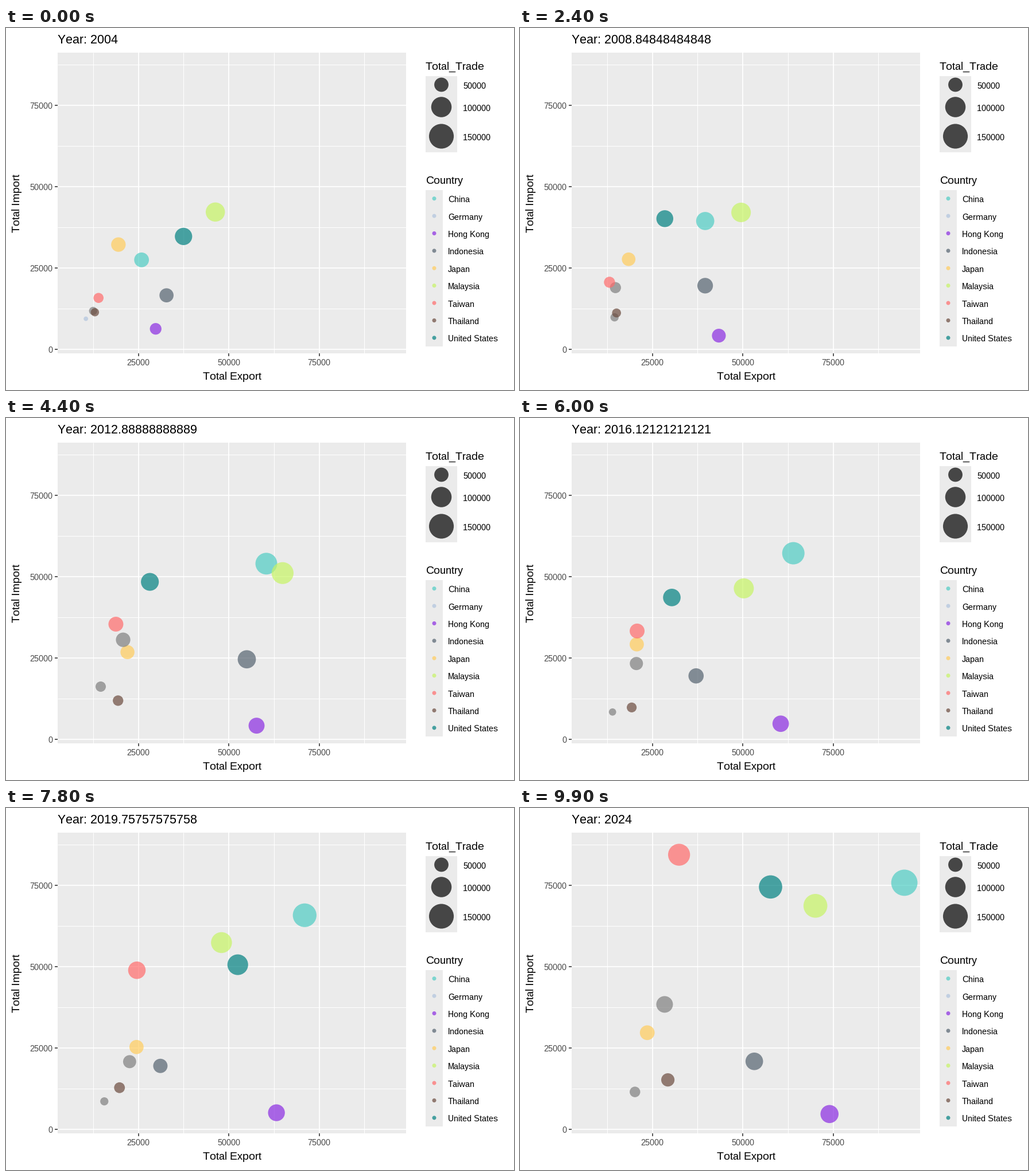
Animation of 885x632 px, one loop 10 s. Source, as a matplotlib script:

```python
import matplotlib.pyplot as plt
import numpy as np
from matplotlib.animation import FuncAnimation
from matplotlib.patches import Circle, Rectangle

W, H, DPI = 885, 632, 100
FRAMES, FIRST, SPAN = 100, 2004, 20
STEPS = [0, 15, 32, 44, 60, 78, 99]
PANEL, GREY, ALPHA = "#EBEBEB", "#7F7F7F", 0.7
SMALL, MEDIUM, LARGE = 15, 19, 22

plt.rcParams.update({
    "font.family": ["Liberation Sans", "DejaVu Sans"],
    "text.hinting": "native",
    "text.hinting_factor": 1,
    "text.kerning_factor": 6,
})

COLORS = {
    "China": "#4ECDC4", "Germany": "#B0C4DE", "Hong Kong": "#8A2BE2",
    "Indonesia": "#556270", "Japan": "#FFCC5C", "Malaysia": "#C7F464",
    "Taiwan": "#FF6B6B", "Thailand": "#6B4B3E", "United States": "#008080",
}


def px(export):
    return 230.5 + 6.3 * (export - 25)


def py(imports):
    return 561 - 5.68 * imports


def radius(total):
    """Area scale: the smallest total gets the smallest dot."""
    return 3.9 + 19.3 * np.sqrt(max(total - 19.9, 0) / 155.4)


def cycle(frame):
    """World trade: the 2009 slump and the 2022 boom."""
    slump = 0.21 * max(0, 1 - abs(frame - 25) / 5)
    boom = 0.12 * max(0, 1 - abs(frame - 89) / 10)
    return 1 - slump + boom


fig = plt.figure(figsize=(W / DPI, H / DPI), dpi=DPI, facecolor="white")
ax = fig.add_axes([0, 0, 1, 1])
ax.set_xlim(0, W)
ax.set_ylim(H, 0)
ax.axis("off")


def box(x0, y0, x1, y1):
    ax.add_patch(Rectangle((x0, y0), x1 - x0, y1 - y0, fc=PANEL, lw=0, zorder=0))


def line(x0, y0, x1, y1, color="white", width=1.0):
    ax.plot([x0, x1], [y0, y1], color=color, lw=width * 72 / DPI,
            solid_capstyle="butt", zorder=1)


def text(x, y, s, size, ha="left", color="black", rotation=0):
    return ax.text(x, y, s, fontsize=size * 72 / DPI, ha=ha, va="baseline",
                   color=color, rotation=rotation, rotation_mode="anchor")


def dot(x, y, r, color, z=2):
    return ax.add_patch(Circle((x, y), r, fc=color, alpha=ALPHA, lw=0, zorder=z))


class Bubble:
    """A dot moving between key points, seen only within their span."""

    def __init__(self, color, exports, imports, start=0):
        self.steps = STEPS[start:start + len(exports)]
        self.exports, self.imports = exports, imports
        self.dot = dot(0, 0, 1, color, 3)

    def move(self, frame):
        last = self.steps[-1]
        shown = self.steps[0] <= frame and (frame < last or last == FRAMES - 1)
        x = np.interp(frame, self.steps, self.exports) * cycle(frame)
        y = np.interp(frame, self.steps, self.imports) * cycle(frame)
        self.dot.center = px(x), py(y)
        self.dot.set_radius(radius(x + y))
        self.dot.set_visible(shown)


# Panel and axes
box(90, 43, 697, 568)
for v in (12.5, 37.5, 62.5, 87.5):
    line(px(v), 43, px(v), 568)
    line(90, py(v), 697, py(v))
for v in (0, 25, 50, 75):
    label = str(v * 1000)
    line(90, py(v), 697, py(v), width=1.8)
    line(85, py(v), 90, py(v), "#333333", 1.6)
    text(81, py(v) + 6, label, SMALL, "right", "#4D4D4D")
    if v:
        line(px(v), 43, px(v), 568, width=1.8)
        line(px(v), 568, px(v), 573, "#333333", 1.6)
        text(px(v), 589, label, SMALL, "center", "#4D4D4D")
text(393.5, 614, "Total Export", MEDIUM, "center")
text(24, 306, "Total Import", MEDIUM, "center", rotation=90)
title = text(89.5, 27, "", LARGE)

# Legends
text(731, 73, "Total_Trade", MEDIUM)
box(731, 84, 786, 216.5)
for total, y in ((50, 99), (100, 138), (150, 189)):
    dot(758.5, y, radius(total), "black")
    text(796, y + 7, str(total * 1000), SMALL)
text(731, 272, "Country", MEDIUM)
box(731, 282.5, 761, 555.5)
for i, (name, color) in enumerate(COLORS.items()):
    y = 297.7 + 30.4 * i
    dot(746, y, 3.5, color)
    text(770, y + 6.5, name, SMALL)

# Exports and imports in thousands at the key steps, back to front
bubbles = [
    Bubble(COLORS["Japan"], [19.5, 21.6, 22.7, 22, 20.7, 24.5, 23.6],
           [32.2, 32.8, 33.7, 26.8, 29.2, 25.3, 29.7]),
    Bubble(GREY, [12.5, 16, 19.4, 20.8, 20.6, 22.6, 28.4],
           [11.8, 19.3, 25.9, 30.6, 23.3, 20.8, 38.4]),
    Bubble(GREY, [16.7, 18.2, 14.6, 14, 15.6, 20.2],
           [8.8, 14.5, 16.2, 8.4, 8.6, 11.5], start=1),
    Bubble(COLORS["Germany"], [10.5, 12.1], [9.4, 11.5]),
    Bubble(COLORS["United States"], [37.5, 39.5, 29.5, 28.2, 30.4, 52.5, 57.7],
           [34.7, 48.7, 47.9, 48.4, 43.6, 50.6, 74.5]),
    Bubble(COLORS["China"], [25.9, 43.5, 51.3, 60.4, 64, 71, 94.7],
           [27.5, 48.2, 46.7, 54, 57.2, 65.8, 75.8]),
    Bubble(COLORS["Malaysia"], [46.3, 58.7, 60.3, 64.9, 50.3, 48, 70.1],
           [42.2, 51.8, 49.5, 51.1, 46.4, 57.4, 68.7]),
    Bubble(COLORS["Indonesia"], [32.8, 44.7, 50.2, 55, 37.1, 31.1, 53.2],
           [16.6, 23.2, 23.8, 24.6, 19.5, 19.5, 20.9]),
    Bubble(COLORS["Hong Kong"], [29.8, 47.4, 56.4, 57.7, 60.5, 63.2, 74],
           [6.3, 5.8, 4.4, 4.2, 4.8, 5.1, 4.7]),
    Bubble(COLORS["Taiwan"], [14, 13.6, 17.8, 18.8, 20.8, 24.6, 32.4],
           [15.8, 23.3, 26.1, 35.4, 33.3, 48.9, 84.4]),
    Bubble(COLORS["Thailand"], [13, 18.9, 17.5, 19.4, 19.3, 19.8, 29.3],
           [11.4, 12.7, 14.1, 11.9, 9.8, 12.8, 15.2]),
]


def update(frame):
    year = FIRST + SPAN * frame / (FRAMES - 1)
    title.set_text(f"Year: {year:.15g}")
    for bubble in bubbles:
        bubble.move(frame)
    return [title] + [b.dot for b in bubbles]


anim = FuncAnimation(fig, update, frames=FRAMES, interval=100,
                     init_func=lambda: update(0), repeat=True, repeat_delay=0)
plt.show()
```
